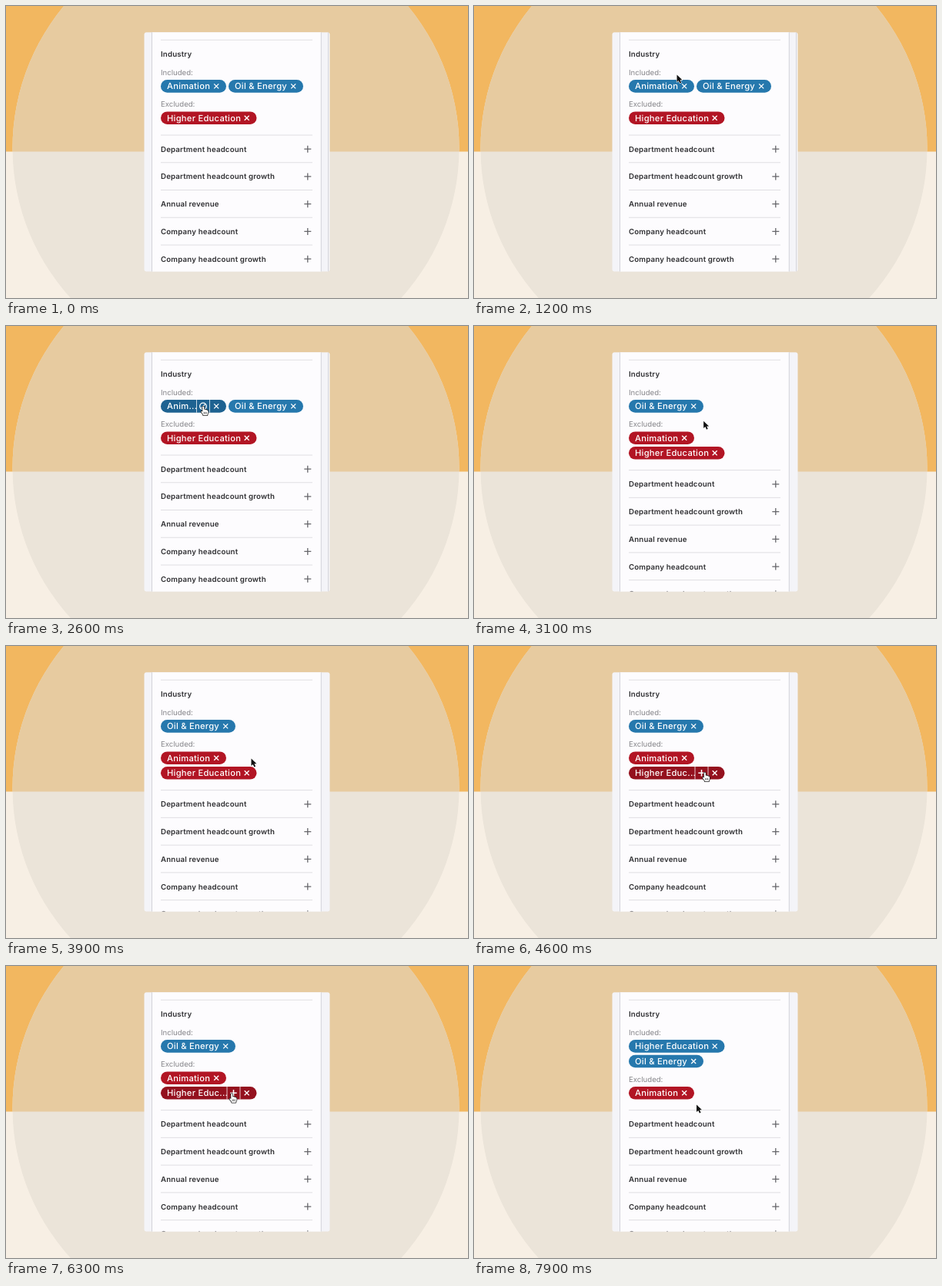
An HTML page with a canvas that plays this animation: 600 by 380 pixels, repeating every 8 s.

```html
<!DOCTYPE html>
<html lang="en">
<head>
<meta charset="utf-8">
<title>Industry filter</title>
<style>
html, body { margin: 0; width: 100%; height: 100%; overflow: hidden; background: #f7efe4; }
canvas { display: block; width: 600px; height: 380px; }
</style>
</head>
<body>
<canvas id="stage"></canvas>
<script>
const LOOP = 8000, STEP = 100;
const MOVE_OUT = 2700, MOVE_IN = 7500;
const ROW = 35.75, PILL_ROW = 19.6, PILL_H = 16.6;
const canvas = document.getElementById('stage');
const ctx = canvas.getContext('2d');
const ratio = window.devicePixelRatio || 1;
canvas.width = 600 * ratio;
canvas.height = 380 * ratio;

const BLUE = ['#2678ad', '#1e6291'];
const RED = ['#b21524', '#94111e'];
const LABELS = {
  anim: { text: 'Animation', short: 'Anim...', w: 85 },
  oil: { text: 'Oil & Energy', short: 'Oil & ...', w: 97 },
  edu: { text: 'Higher Education', short: 'Higher Educ...', w: 124.5 }
};
const ROWS = ['Department headcount', 'Department headcount growth', 'Annual revenue',
  'Company headcount', 'Company headcount growth'];

// Text styles: size, weight, letter spacing, colour
const TITLE = [9.7, 600, 0.16, '#2f2f32'];
const NOTE = [9.6, 400, 0, '#858589'];
const TAG = [11.2, 500, 0.25, '#fff'];

// Pointer path: time, x, y
const PATH = [
  [800, 306, 352], [1000, 279, 180], [1200, 263.5, 89.5], [1500, 260, 101],
  [1900, 256.5, 104.5], [2800, 256.5, 104.5], [3200, 312, 130], [3500, 333.5, 141],
  [3700, 333, 142], [3900, 318.5, 146.5], [4400, 302, 163], [4800, 298, 166],
  [5500, 298, 166], [5900, 293.5, 166], [7500, 293.5, 166], [7900, 289, 180.5]
];

function pointerAt(t) {
  if (t < PATH[0][0]) return null;
  for (let i = 1; i < PATH.length; i++) {
    const [t0, x0, y0] = PATH[i - 1], [t1, x1, y1] = PATH[i];
    if (t <= t1) {
      const k = (t - t0) / (t1 - t0);
      return { x: x0 + (x1 - x0) * k, y: y0 + (y1 - y0) * k };
    }
  }
  const last = PATH[PATH.length - 1];
  return { x: last[1], y: last[2] };
}

function layout(t) {
  const pill = (id, x, y, tone) => ({ ...LABELS[id], x, y, tone });
  const y1 = 104.4, y2 = 145.7;
  if (t < MOVE_OUT) return {
    excluded: 128, shift: 0,
    pills: [pill('anim', 201, y1, BLUE), pill('oil', 289, y1, BLUE), pill('edu', 201, y2, RED)]
  };
  if (t < MOVE_IN) return {
    excluded: 128, shift: PILL_ROW,
    pills: [pill('oil', 201, y1, BLUE), pill('anim', 201, y2, RED), pill('edu', 201, y2 + PILL_ROW, RED)]
  };
  return {
    excluded: 128 + PILL_ROW, shift: PILL_ROW,
    pills: [pill('edu', 201, y1, BLUE), pill('oil', 201, y1 + PILL_ROW, BLUE), pill('anim', 201, y2 + PILL_ROW, RED)]
  };
}

function text(str, x, mid, [size, weight, spacing, color]) {
  ctx.font = `${weight} ${size}px Inter, sans-serif`;
  ctx.letterSpacing = `${spacing}px`;
  ctx.fillStyle = color;
  ctx.fillText(str, x, mid + size * 0.364);
}

function lines(color, width, ...segs) {
  ctx.strokeStyle = color;
  ctx.lineWidth = width;
  ctx.beginPath();
  for (const [x0, y0, x1, y1] of segs) {
    ctx.moveTo(x0, y0);
    ctx.lineTo(x1, y1);
  }
  ctx.stroke();
}

function cross(x, y, r) {
  lines('#fff', 1.3, [x - r, y - r, x + r, y + r], [x - r, y + r, x + r, y - r]);
}

function plus(x, y, r, color, width) {
  lines(color, width, [x - r, y, x + r, y], [x, y - r, x, y + r]);
}

function rounded(x, y, w, h, r) {
  ctx.beginPath();
  ctx.roundRect(x, y, w, h, r);
}

function drawPill(p, hover) {
  const right = p.x + p.w, top = p.y - PILL_H / 2, bottom = top + PILL_H;
  ctx.fillStyle = p.tone[hover ? 1 : 0];
  rounded(p.x, top, p.w, PILL_H, PILL_H / 2);
  ctx.fill();
  text(hover ? p.short : p.text, p.x + 8, p.y, TAG);
  cross(right - 12.8, p.y, 3);
  if (!hover) return;
  const a = right - 38.5, b = right - 21.5, mid = (a + b) / 2;
  lines('rgba(255,255,255,.75)', 1, [a, top, a, bottom], [b, top, b, bottom]);
  if (p.tone === RED) {
    plus(mid, p.y, 4.2, '#fff', 1.5);
  } else {
    ctx.strokeStyle = '#fff';
    ctx.lineWidth = 1.3;
    ctx.beginPath();
    ctx.arc(mid, p.y, 4.3, 0, Math.PI * 2);
    ctx.stroke();
    lines('#fff', 1.3, [mid - 3, p.y + 3, mid + 3, p.y - 3]);
  }
}

const ARROW = new Path2D('M0 0V9.4L2.2 7.4L3.9 11L5.6 10.2L4 6.8H7Z');
const HAND = new Path2D('M-1.2 1Q-1.2 0 -.2 0T.8 1V4.2Q2.3 3.6 2.8 4.7Q4.2 4.2 4.6 5.3Q6 5 6 6.5' +
  'V8.4Q6 9.4 5 10.4V11.8H-.4V10.8L-2.8 7.8Q-3.4 6.7 -2.5 6.3Q-2 6.2 -1.2 7.2Z');

function drawPointer(p, hand) {
  ctx.save();
  ctx.translate(p.x, p.y);
  ctx.lineJoin = 'round';
  ctx.lineWidth = hand ? 1.5 : 1.2;
  ctx.strokeStyle = hand ? '#1c1c1c' : '#fff';
  ctx.fillStyle = hand ? '#fff' : '#111';
  const shape = hand ? HAND : ARROW;
  ctx.stroke(shape);
  ctx.fill(shape);
  if (hand) lines('#333', 0.7, [0.6, 7.4, 0.6, 10], [2.2, 7.4, 2.2, 10], [3.8, 7.4, 3.8, 10]);
  ctx.restore();
}

function background() {
  const horizon = 189.5;
  const band = (top, bottom) => {
    ctx.fillStyle = bottom;
    ctx.fillRect(0, 0, 600, 380);
    ctx.fillStyle = top;
    ctx.fillRect(0, 0, 600, horizon);
  };
  band('#f2b760', '#f7efe4');
  ctx.save();
  ctx.beginPath();
  ctx.arc(298.5, 185, 290, 0, Math.PI * 2);
  ctx.clip();
  band('#e7cba0', '#ebe4d9');
  ctx.restore();
}

function draw(t) {
  ctx.setTransform(ratio, 0, 0, ratio, 0, 0);
  ctx.textRendering = 'geometricPrecision';
  background();
  const state = layout(t), pointer = pointerAt(t);

  ctx.save();
  rounded(179.5, 34.3, 241, 311.2, 3);
  ctx.clip();
  ctx.fillStyle = '#f4f4f8';
  ctx.fillRect(179, 34, 242, 313);
  ctx.fillStyle = '#fdfcfe';
  ctx.fillRect(190, 34, 219, 313);
  lines('#d3d3d9', 1, [189.5, 34, 189.5, 346], [409.3, 34, 409.3, 346]);
  if (t < MOVE_OUT) lines('#d5d4d9', 1, [418.5, 34, 418.5, 346]);

  lines('#dfdee2', 1, [201, 44.2, 398, 44.2]);
  text('Industry', 201, 62.3, TITLE);
  text('Included:', 201, 86.8, NOTE);
  text('Excluded:', 201, state.excluded, NOTE);

  ROWS.forEach((label, i) => {
    const mid = 186.2 + state.shift + i * ROW;
    const edge = mid - 18.2;
    lines('#dfdee2', 1, [201, edge, 398, edge]);
    text(label, 201, mid, TITLE);
    plus(391.8, mid, 4.5, '#66666a', 1.3);
  });

  let hand = false;
  for (const p of state.pills) {
    const hover = !!pointer && pointer.x > p.x && pointer.x < p.x + p.w && Math.abs(pointer.y - p.y) < PILL_H / 2;
    hand = hand || hover;
    drawPill(p, hover);
  }
  if (pointer) drawPointer(pointer, hand);
  ctx.restore();
}

const start = performance.now();
function tick() {
  const t = (performance.now() - start) % LOOP;
  draw(Math.floor(t / STEP) * STEP);
  requestAnimationFrame(tick);
}
tick();
</script>
</body>
</html>
```
